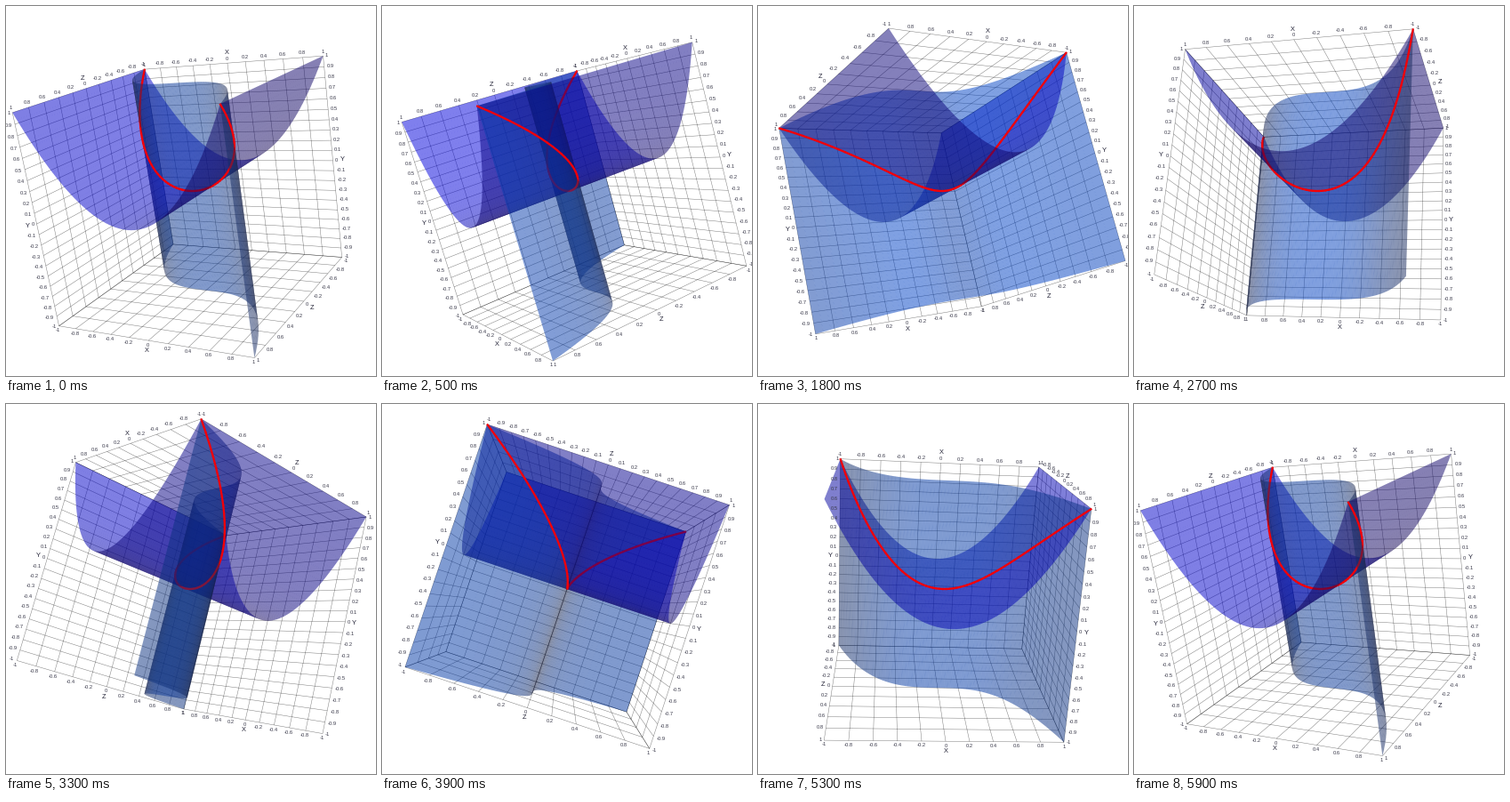
A matplotlib script for the animation above (6000 ms loop, 416 by 416 pixels).

```python
import numpy as np
import matplotlib.pyplot as plt
from matplotlib.animation import FuncAnimation
from matplotlib.collections import LineCollection, PolyCollection

SIZE, DPI = 416, 100
FRAMES, INTERVAL = 60, 100
PX = 72 / DPI                       # one pixel in points
DIST = np.sqrt(3) / np.sin(np.radians(15))
SCALE = 122.6                       # pixels per unit at the centre
SLABS = 64
RIBBON_BIAS = 0.12                  # lifts the curve over the sheets it lies in


def unit(v):
    return v / (np.linalg.norm(v, axis=-1, keepdims=True) + 1e-9)


UP = unit(np.array([-0.0262, 0.9484, -0.3160]))
RIGHT = unit(np.cross(UP, [0.524, 0.282, 0.804]))
EYE = np.cross(RIGHT, UP)

# The surfaces y = x^2 and z = x^3 are cut into thin slabs along x.
# Both meet in the curve (x, x^2, x^3), which splits each slab into four arms.
x = np.linspace(-1, 1, SLABS + 1)
xm = (x[:-1] + x[1:]) / 2
CURVE = np.stack([x, x**2, x**3], -1)
MID = np.stack([xm, xm**2, xm**3], -1)
ZERO, ONE = np.zeros(SLABS), np.ones(SLABS)
PARABOLA_N = unit(np.stack([-2 * xm, ONE, ZERO], -1))
CUBIC_N = unit(np.stack([-3 * xm**2, ZERO, ONE], -1))

# (dim, lit) colours for the front and back side of each surface
PARABOLA_TINT = ((0, 0, 140), (0, 0, 238)), ((22, 6, 76), (3, 0, 145))
CUBIC_TINT = ((28, 34, 60), (0, 57, 170)), ((28, 34, 65), (0, 68, 203))
RED = (0.95, 0, 0.03, 1)


def camera(frame):
    a = 2 * np.pi * frame / (FRAMES - 1)
    eye = np.cos(a) * EYE + np.sin(a) * RIGHT
    right = np.cos(a) * RIGHT - np.sin(a) * EYE
    return right, eye


def project(p, cam):
    right, eye = cam
    depth = 1 - p @ eye / DIST
    return SCALE * np.stack([p @ right, p @ UP], -1) / depth[..., None]


def normal(d):
    return unit(np.stack([-d[..., 1], d[..., 0]], -1))


def shade(cos, tint):
    (dim_f, lit_f), (dim_b, lit_b) = np.array(tint) / 255
    c = np.abs(cos)[:, None] ** 0.8
    front = dim_f + (lit_f - dim_f) * c
    back = dim_b + (lit_b - dim_b) * c
    rgb = np.where(cos[:, None] > 0, front, back)
    return np.column_stack([rgb, np.full(len(cos), 0.5)])


def strips(axis, end, cam):
    """Screen quads from the curve to the box wall, slightly widened to hide seams."""
    tip = CURVE.copy()
    tip[:, axis] = end
    core, tip = project(CURVE, cam), project(tip, cam)
    a, b, c, d = core[:-1], tip[:-1], tip[1:], core[1:]
    n = normal((b - a) + (c - d))
    n *= np.sign(np.sum(n * (c + d - a - b), -1, keepdims=True)) * 0.065
    return np.stack([a - n, b - n, c + n, d + n], 1)


def ribbon(cam, half=1.15, overlap=0.5):
    p = project(CURVE, cam)
    d = unit(p[1:] - p[:-1])
    a, b = p[:-1] - d * overlap, p[1:] + d * overlap
    n = normal(d) * half
    return np.stack([a - n, b - n, b + n, a + n], 1)


def scene(cam):
    """Quads and colours from back to front."""
    eye = cam[1] * DIST
    view = unit(eye - MID)
    cos_p = np.sum(PARABOLA_N * view, -1)
    cos_c = np.sum(CUBIC_N * view, -1)
    above = (cos_p > 0)[:, None, None]
    ahead = (cos_c > 0)[:, None, None]
    y_lo, y_hi = strips(1, -1, cam), strips(1, 1, cam)
    z_lo, z_hi = strips(2, -1, cam), strips(2, 1, cam)
    quads = np.stack([
        np.where(above, y_lo, y_hi),
        np.where(ahead, z_lo, z_hi),
        np.where(above, y_hi, y_lo),
        np.where(ahead, z_hi, z_lo),
        ribbon(cam),
    ], 1)
    par, cub = shade(cos_p, PARABOLA_TINT), shade(cos_c, CUBIC_TINT)
    colors = np.stack([cub, par, cub, par, np.tile(RED, (SLABS, 1))], 1)
    depth = np.repeat(np.abs(xm - eye[0])[:, None], 5, axis=1)
    depth[:, 4] -= RIBBON_BIAS
    order = np.argsort(-depth.ravel(), kind="stable")
    return quads.reshape(-1, 4, 2)[order], colors.reshape(-1, 4)[order]


def edge(axis, fixed, values):
    p = np.zeros((len(values), 3))
    p[:, axis] = values
    for i, v in fixed:
        p[:, i] = v
    return p


def ticks(face, axis, cam):
    """Tick values for one axis of a box face, by its length on screen."""
    if axis == 1:
        return np.linspace(-1, 1, 21)
    other = 3 - face[0] - axis
    a, b = project(edge(axis, [face, (other, -face[1])], [-1, 1]), cam)
    length = np.hypot(*(b - a))
    return np.linspace(-1, 1, 21 if length > 275 else 11 if length > 70 else 5)


def grid_lines(faces, cam):
    lines = []
    for face in faces:
        j, k = [i for i in range(3) if i != face[0]]
        for axis, along in ((j, k), (k, j)):
            for t in ticks(face, axis, cam):
                lines.append(edge(along, [face, (axis, t)], [-1, 1]))
    return project(np.array(lines), cam)


def label(pos, s, size, color):
    ax.text(*pos, s, fontsize=size * PX, color=color, ha="center", va="center",
            family="Liberation Sans", zorder=3)


def label_edge(face, side, cam):
    axis = 3 - face[0] - side[0]
    values = ticks(face, axis, cam)
    pts = project(edge(axis, [face, side], values), cam)
    mid = project(edge(axis, [face, side], [0]), cam)[0]
    n = normal(pts[-1] - pts[0])
    if n @ mid < 0:
        n = -n
    for v, p in zip(values, pts):
        s = f"{round(v, 1) + 0:g}"
        gap = 2.3 + abs(n[0]) * 1.45 * len(s) + abs(n[1]) * 2.5
        label(p + n * gap, s, 5.9, "#3c3c4c")
    gap = 8 + abs(n[0]) * 2 + abs(n[1]) * 3.5
    label(mid + n * gap, "XYZ"[axis], 7.4, "#202034")


fig = plt.figure(figsize=(SIZE / DPI, SIZE / DPI), dpi=DPI, facecolor="white")
ax = fig.add_axes([0, 0, 1, 1])
ax.set(xlim=(-SIZE / 2, SIZE / 2), ylim=(-SIZE / 2, SIZE / 2))
ax.axis("off")
grid = LineCollection([], colors="black", linewidths=0.5 * PX, alpha=0.5, zorder=1)
solid = PolyCollection([], linewidths=0, edgecolors="none", zorder=2)
solid.set_snap(False)
grid.set_snap(False)
ax.add_collection(grid, autolim=False)
ax.add_collection(solid, autolim=False)


def update(frame):
    cam = camera(frame)
    walls = [(i, s) for i in range(3) for s in (-1, 1)]
    faces = [w for w in walls if w[1] * cam[1][w[0]] < 0.04]
    grid.set_segments(grid_lines(faces, cam))

    quads, colors = scene(cam)
    solid.set_verts(quads)
    solid.set_facecolor(colors)

    for t in list(ax.texts):
        t.remove()
    # Label the edges where a drawn wall meets an open side.
    for face in faces:
        for side in walls:
            if side[0] != face[0] and side not in faces:
                label_edge(face, side, cam)
    return grid, solid


anim = FuncAnimation(fig, update, frames=FRAMES, interval=INTERVAL,
                     repeat=True, repeat_delay=0, blit=False)
plt.show()
```
